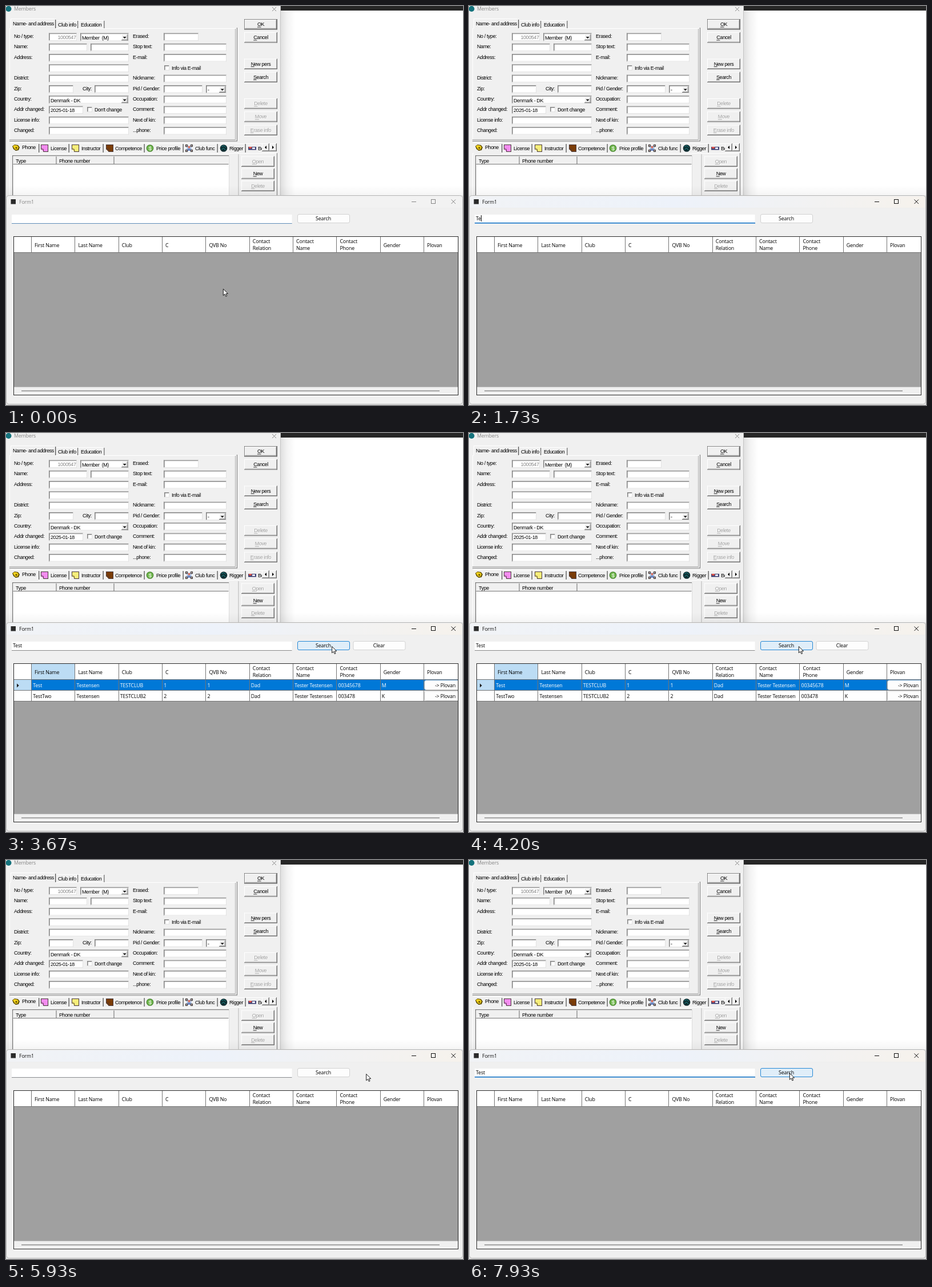
Animation of 800x700 px, one loop 8 s. Source, as an HTML page with a canvas:

```html
<!DOCTYPE html>
<html lang="en">
<head>
<meta charset="utf-8">
<title>Member search</title>
<style>
html, body { margin: 0; width: 100%; height: 100%; overflow: hidden; background: #fff; }
canvas { display: block; width: 800px; height: 700px; }
</style>
</head>
<body>
<canvas id="stage" width="800" height="700"></canvas>
<script>
const ctx = document.getElementById('stage').getContext('2d');
const LOOP = 8000, TICK = 1000 / 15;
const CLASSIC = '9px "Liberation Sans", Arial, sans-serif';
const MODERN = '8.8px "Open Sans", "Noto Sans", sans-serif';
const FACE = '#f0f0f0', BLUE = '#0067c0';

function rect(x, y, w, h, color) {
  ctx.fillStyle = color;
  ctx.fillRect(x, y, w, h);
}

function text(s, x, y, color = '#000', modern = false, align = 'left') {
  ctx.font = modern ? MODERN : CLASSIC;
  ctx.letterSpacing = modern ? '-0.15px' : '-0.42px';
  ctx.textAlign = align;
  ctx.textBaseline = 'alphabetic';
  ctx.fillStyle = color;
  ctx.fillText(s, x, y + 3.2);
}

const ui = (s, x, y, color, align) => text(s, x, y, color, true, align);

function line(points, color, width = 1) {
  ctx.beginPath();
  points.forEach(([x, y]) => ctx.lineTo(x, y));
  ctx.strokeStyle = color;
  ctx.lineWidth = width;
  ctx.stroke();
}

function poly(points, color) {
  ctx.beginPath();
  points.forEach(([x, y]) => ctx.lineTo(x, y));
  ctx.closePath();
  ctx.fillStyle = color;
  ctx.fill();
}

function disc(x, y, r, color) {
  ctx.beginPath();
  ctx.arc(x, y, r, 0, 7);
  ctx.fillStyle = color;
  ctx.fill();
}

function rounded(x, y, w, h, r, fill, stroke) {
  ctx.beginPath();
  ctx.roundRect(x, y, w, h, r);
  ctx.fillStyle = fill;
  ctx.fill();
  ctx.strokeStyle = stroke;
  ctx.lineWidth = 1;
  ctx.stroke();
}

function field(x, y, w, h = 13.5) {
  rect(x, y, w, h, '#fff');
  rect(x, y, w, 1, '#8b8b8b');
  rect(x, y, 1, h, '#8b8b8b');
  rect(x + 1, y + 1, w - 2, 0.6, '#777');
  rect(x + 1, y + 1, 0.6, h - 2, '#777');
  rect(x, y + h - 1, w, 0.8, '#dcdcdc');
  rect(x + w - 1, y, 0.8, h, '#dcdcdc');
}

function raised(x, y, w, h) {
  rect(x, y, w, h, FACE);
  rect(x, y, w, 1, '#fff');
  rect(x, y, 1, h, '#fff');
  rect(x + 1, y + h - 2, w - 2, 1, '#b4b4b4');
  rect(x + w - 2, y + 1, 1, h - 2, '#b4b4b4');
  rect(x, y + h - 1, w, 1, '#696969');
  rect(x + w - 1, y, 1, h, '#696969');
}

function oldButton(s, x, y, enabled = true, main = false) {
  const w = 58, h = 18.5;
  if (main) {
    rect(x, y, w, h, '#444');
    raised(x + 0.8, y + 0.8, w - 1.6, h - 1.6);
  } else raised(x, y, w, h);
  const cx = x + w / 2, cy = y + h / 2;
  if (!enabled) text(s, cx + 0.8, cy + 0.8, '#fff', false, 'center');
  const color = enabled ? '#000' : '#a0a0a0';
  text(s, cx, cy, color, false, 'center');
  const left = cx - ctx.measureText(s).width / 2;
  rect(left, cy + 4.3, ctx.measureText(s[0]).width, 0.8, color);
}

function combo(s, x, y, w) {
  field(x, y, w, 14);
  text(s, x + 3, y + 8);
  raised(x + w - 13, y + 2, 11.5, 11);
  const cx = x + w - 7.3;
  poly([[cx - 3, y + 6.5], [cx + 3, y + 6.5], [cx, y + 9.5]], '#000');
}

function checkbox(s, x, y) {
  field(x, y, 9, 9);
  text(s, x + 13, y + 4.5);
}

function tabIcons() {
  poly([[11, 246], [15, 243], [21, 244], [24, 248], [22, 253], [17, 254], [13, 251]], '#5b4a00');
  poly([[12, 246], [15, 244], [20, 245], [22, 248], [20, 252], [16, 252]], '#f2d21c');
  disc(18, 249, 1.7, '#6b5800');
  [[61, '#f48cf0'], [115, '#f7ee7a'], [175, '#7a3c08']].forEach(([x, color]) => {
    rect(x, 243, 13, 13, '#4a3a3a');
    rect(x + 1, 244, 11, 11, color);
    poly([[x, 251], [x + 5, 256], [x, 256]], FACE);
    line([[x, 251], [x + 4, 251], [x + 5, 256]], '#4a3a3a');
  });
  disc(252, 249.5, 6.3, '#3f7d28');
  disc(252, 249.5, 5.2, '#72b84f');
  text('$', 252, 249.5, '#fff', false, 'center');
  rect(316, 245, 9, 9, '#b9cbe6');
  disc(320.5, 247.5, 2, '#d86a55');
  rect(318, 250, 5, 4, '#6d87c2');
  for (const x of [314, 323]) for (const y of [243, 252]) {
    rect(x, y, 4, 4, '#333');
    rect(x + 1, y + 1, 2, 2, '#c9b0b0');
  }
  disc(381, 249.5, 6.3, '#102c30');
  line([[377, 247], [381, 245], [385, 248]], '#188a8c');
  line([[377, 252], [381, 249], [384, 253]], '#188a8c');
  rect(424, 247, 14, 5.5, '#3a3d70');
  rect(425, 247, 5, 3, '#d9534a');
  rect(431, 248, 5, 3, '#e9e9f5');
}

function memberWindow() {
  rect(0, 0, 800, 332, '#fff');
  const shade = ctx.createLinearGradient(481, 0, 506, 0);
  shade.addColorStop(0, '#e0e0e0');
  shade.addColorStop(0.45, '#f3f3f3');
  shade.addColorStop(1, '#fff');
  rect(481, 8, 25, 324, shade);
  rect(481, 0, 319, 8, '#262626');
  rect(0, 0, 481, 332, FACE);
  rect(480, 0, 1, 332, '#c4c4c4');

  disc(4.5, 5, 5, '#14727c');
  ui('Members', 14, 5, '#858585');
  line([[466, 2], [473, 9]], '#858585');
  line([[473, 2], [466, 9]], '#858585');

  // Upper tabs and panel
  rect(6, 39, 396, 1, '#fff');
  rect(6, 39, 1, 196, '#fff');
  rect(401, 40, 1, 195, '#a8a8a8');
  rect(404, 38, 1, 199, '#777');
  rect(6, 234, 396, 1, '#a8a8a8');
  rect(6, 236.5, 399, 1, '#777');
  rect(8, 22, 78, 18, FACE);
  rect(8, 22, 77, 1, '#fff');
  rect(8, 22, 1, 17, '#fff');
  rect(86, 24, 1.3, 15, '#555');
  rect(88, 25, 83, 1, '#fff');
  rect(125, 26, 1.2, 13, '#666');
  rect(171.3, 26, 1.2, 13, '#666');
  text('Name- and address', 12, 31);
  text('Club info', 91, 32.5);
  text('Education', 131, 32.5);

  const row = i => 47.5 + i * 18.3;
  ['No / type:', 'Name:', 'Address:', '', 'District:', 'Zip:', 'Country:',
    'Addr changed:', 'License info:', 'Changed:']
    .forEach((s, i) => text(s, 14, row(i) + 5.4));
  ['Erased:', 'Stop text:', 'E-mail:', '', 'Nickname:', 'Pid / Gender:', 'Occupation:',
    'Comment:', 'Next of kin:', '...phone:']
    .forEach((s, i) => text(s, 222, row(i) + 5.4));
  field(75, row(0), 49);
  text('1000547', 122.5, row(0) + 7.4, '#858585', false, 'right');
  combo('Member  (M)', 130, row(0), 85);
  field(75, row(1), 67);
  field(148, row(1), 67);
  [2, 3, 4, 8, 9].forEach(i => field(75, row(i), 140));
  field(75, row(5), 43);
  text('City:', 134, row(5) + 5.8);
  field(155, row(5), 60);
  combo('Denmark - DK', 75, row(6), 140);
  field(75, row(7), 60);
  text('2025-01-18', 78, row(7) + 7.3);
  checkbox("Don't change", 142, 177);
  field(276, row(0), 61);
  [1, 2, 4, 6, 7, 8, 9].forEach(i => field(276, row(i), 110));
  checkbox('Info via E-mail', 277, 104);
  field(276, row(5), 68);
  combo('-', 350, row(5), 36);

  oldButton('OK', 417, 23, true, true);
  oldButton('Cancel', 417, 46);
  oldButton('New pers', 417, 92.5);
  oldButton('Search', 417, 115.5);
  oldButton('Delete', 417, 162, false);
  oldButton('Move', 417, 185, false);
  oldButton('Erase info', 417, 208.5, false);

  // Lower tabs
  rect(6, 258, 468, 1, '#fff');
  rect(6, 258, 1, 74, '#fff');
  rect(8, 239, 49, 20, FACE);
  rect(8, 239, 49, 1, '#fff');
  rect(58, 241, 390, 1, '#fff');
  [57, 109.5, 169.5, 241.5, 309.5, 369.5, 418.5].forEach(x => rect(x, 242, 1.3, 15, '#555'));
  tabIcons();
  text('Phone', 28, 248);
  [['License', 78], ['Instructor', 132], ['Competence', 191], ['Price profile', 263],
    ['Club func', 331], ['Rigger', 391], ['Bo', 441]]
    .forEach(([s, x]) => text(s, x, 250));
  raised(448, 241, 13, 14);
  raised(461, 241, 13, 14);
  poly([[456, 245], [456, 251], [453, 248]], '#000');
  poly([[466, 245], [466, 251], [469, 248]], '#000');

  rect(11, 262, 380, 70, '#fff');
  rect(11, 262, 380, 1.3, '#777');
  rect(11, 262, 1.3, 70, '#777');
  rect(12.5, 263.5, 377, 14, FACE);
  rect(12.5, 277, 377, 1, '#777');
  rect(390, 262, 1, 70, '#dcdcdc');
  [87.5, 188.5].forEach(x => rect(x, 264, 1, 13, '#666'));
  text('Type', 17, 271.5);
  text('Phone number', 93, 271.5);
  rect(406.5, 260, 1, 72, '#b4b4b4');
  rect(474, 258, 1, 74, '#777');
  oldButton('Open', 412, 263.5, false);
  oldButton('New', 412, 285);
  oldButton('Delete', 412, 306.5, false);

  const low = ctx.createLinearGradient(0, 314, 0, 332);
  low.addColorStop(0, 'rgba(0,0,0,0)');
  low.addColorStop(1, 'rgba(0,0,0,.04)');
  rect(0, 314, 800, 18, low);
}

function pushButton(s, x, hover, pressed) {
  const face = (fill, edge) => rounded(x + 0.5, 365.5, 91, 15, 2.5, fill, edge);
  face('#fdfdfd', '#d2d2d2');
  ctx.globalAlpha = hover;
  face('#e0eef9', '#2488d6');
  ctx.globalAlpha = 1;
  if (pressed) face('#cce4f7', '#1f66a3');
  ui(s, x + 45.5, 373.2, '#000', 'center');
}

const GRID = { left: 13.5, right: 791.5, top: 404.5, bottom: 682.5 };
const colX = i => 44.4 + i * 76.33;
const HEADS = ['First Name', 'Last Name', 'Club', 'C', 'QVB No', 'Contact|Relation',
  'Contact|Name', 'Contact|Phone', 'Gender', 'Plovan'];
const ROWS = [
  ['Test', 'Testensen', 'TESTCLUB', '1', '1', 'Dad', 'Tester Testensen', '00345678', 'M'],
  ['TestTwo', 'Testensen', 'TESTCLUB2', '2', '2', 'Dad', 'Tester Testensen', '003478', 'K']
];

function columnLines(y, h) {
  HEADS.forEach((s, i) => rect(Math.floor(colX(i)), y, 1, h, '#747474'));
}

function grid(filled) {
  const { left, right, top, bottom } = GRID;
  const w = right - left;
  ctx.save();
  ctx.beginPath();
  ctx.rect(left, top, w, bottom - top);
  ctx.clip();
  rect(left, top, w, bottom - top, '#a0a0a0');
  rect(left, top, w, 28, '#fff');
  if (filled) rect(colX(0), top, 76.33, 28, '#bcdcf4');
  HEADS.forEach((s, i) => {
    const parts = s.split('|');
    parts.forEach((p, k) => ui(p, colX(i) + 5.7, parts.length > 1 ? 413 + k * 11.5 : 419.3));
  });
  columnLines(405, 28);
  rect(left, 432, w, 1, '#747474');

  if (filled) ROWS.forEach((cells, r) => {
    const y = 433 + r * 19;
    rect(left, y, w, 18, r ? '#fff' : '#0078d7');
    rect(left, y, 31, 18, r ? '#fff' : '#bcdcf4');
    cells.forEach((s, i) => ui(s, colX(i) + 2.8, y + 10, r ? '#000' : '#fff'));
    rounded(colX(9) + 1.5, y + 1, 72, 16.5, 2.5, '#fdfdfd', '#d2d2d2');
    ui('-> Plovan', 769, y + 9.3, '#000', 'center');
    columnLines(y, 19);
    rect(left, y + 18, w, 1, '#747474');
    if (!r) poly([[19, y + 6.5], [22.8, y + 10], [19, y + 13.5]], '#222');
  });

  rect(left, 668.5, w, 14, FACE);
  rect(27, 674.6, 732, 1.4, '#858585');
  ctx.restore();
  ctx.strokeStyle = '#2a2a2a';
  ctx.lineWidth = 1;
  ctx.strokeRect(left, top, w, bottom - top);
}

function formWindow(s) {
  rect(0, 332, 800, 368, '#e4e4e4');
  rounded(0.5, 332.5, 799, 366, 5, FACE, '#b4b4b4');
  if (s.active) {
    const tint = ctx.createLinearGradient(0, 0, 800, 0);
    tint.addColorStop(0, '#f1f3f6');
    tint.addColorStop(0.45, '#edf2fa');
    tint.addColorStop(1, '#f6f2ec');
    rect(2, 334, 796, 20, tint);
  } else rect(2, 334, 796, 20, '#f2f2f2');
  rect(1, 354, 798, 1, '#ededed');
  const ink = s.active ? '#111' : '#858585';
  rect(8.5, 339, 8.5, 8.5, '#2b2b2b');
  ui('Form1', 23, 343.3, ink);
  line([[710, 343.5], [718, 343.5]], ink);
  ctx.strokeRect(744.5, 339.5, 7, 7);
  line([[779.5, 339.5], [787, 347]], ink);
  line([[787, 339.5], [779.5, 347]], ink);

  rect(10, 365, 490.5, 17, '#fff');
  rect(10, 365, 490.5, 0.5, '#e3e3e3');
  rect(10, 381, 490.5, 1, '#8a8a8a');
  ctx.globalAlpha = s.glow;
  rect(10, 381, 490.5, 1, '#5f8db8');
  ctx.globalAlpha = s.focus;
  rect(10, 381, 490.5, 1, '#fff');
  rect(10, 380, 491, 1.5, BLUE);
  ctx.globalAlpha = 1;
  ui(s.typed, 12, 372.5);
  if (s.caret) rect(12 + ctx.measureText(s.typed).width, 367, 1, 11, '#000');

  pushButton('Search', 510, s.searchHover, s.searchDown);
  if (s.filled) pushButton('Clear', 607.5, s.clearHover, s.clearDown);
  grid(s.filled);
}

// Pointer paths; each one is visible from its first to its last time
const PATHS = [
  [[0, 380, 496], [70, 380, 496], [400, 424, 444], [730, 459, 391], [870, 459, 383.5], [930, 459, 375], [990, 459, 375]],
  [[2660, 526, 363], [2800, 554, 370], [3000, 554, 370], [3065, 554.5, 373.5], [3330, 556, 374],
    [3800, 576, 374], [4130, 576, 374], [4200, 577, 374], [4530, 631, 380], [4670, 631, 379],
    [4930, 631, 375], [5930, 631, 375], [6200, 580, 376], [6390, 545, 374]],
  [[6860, 555, 383], [7060, 555, 383]],
  [[7395, 555, 383], [7600, 555, 383], [7930, 561, 373.5], [8000, 561, 373.5]]
];

function pointer(t) {
  for (const path of PATHS) {
    for (let i = 1; i < path.length; i++) {
      const [t0, x0, y0] = path[i - 1], [t1, x1, y1] = path[i];
      if (t < t0 || t >= t1) continue;
      const k = (t - t0) / (t1 - t0);
      return [x0 + (x1 - x0) * k, y0 + (y1 - y0) * k];
    }
  }
  return null;
}

function drawPointer([x, y]) {
  ctx.save();
  ctx.translate(x + 0.3, y);
  ctx.beginPath();
  [[0, 0.5], [0, 11.8], [2.7, 9.4], [4.6, 13.5], [6.4, 12.7], [4.6, 8.8], [8.2, 8.6]]
    .forEach(([px, py]) => ctx.lineTo(px, py));
  ctx.closePath();
  ctx.fillStyle = '#fff';
  ctx.fill();
  ctx.strokeStyle = '#000';
  ctx.lineWidth = 0.9;
  ctx.stroke();
  ctx.restore();
}

const between = (t, a, b) => t >= a && t < b;
const ramp = (t, start, time) => Math.min(1, Math.max(0, (t - start) / time));
const pulse = (t, on, off) => ramp(t, on, 130) * (1 - ramp(t, off, 200));

function typed(t) {
  if (between(t, 3330, 5925)) return 'Test';
  const keys = t < 5925 ? [1530, 1725, 1925, 2060] : [6595, 6725, 6860, 7395];
  return 'Test'.slice(0, keys.filter(k => t >= k).length);
}

function stateAt(t) {
  return {
    active: t >= 1260,
    filled: between(t, 3330, 5925),
    typed: typed(t),
    caret: between(t, 1260, 2595) || between(t, 5990, 7925),
    glow: 1 - ramp(t, 66, 330),
    focus: t < 5000 ? ramp(t, 1200, 260) * (1 - ramp(t, 3330, 260)) : ramp(t, 5925, 260),
    searchHover: Math.max(pulse(t, 2600, 4260), pulse(t, 6060, 6730), ramp(t, 7600, 200)),
    searchDown: between(t, 3195, 3330),
    clearHover: ramp(t, 4330, 190),
    clearDown: between(t, 5725, 5925)
  };
}

function frame(now) {
  const raw = now % LOOP;
  const t = Math.floor((raw + 4) / TICK) * TICK % LOOP;
  memberWindow();
  formWindow(stateAt(t));
  const p = pointer(t);
  if (p) drawPointer(p);
  requestAnimationFrame(frame);
}
requestAnimationFrame(frame);
</script>
</body>
</html>
```
